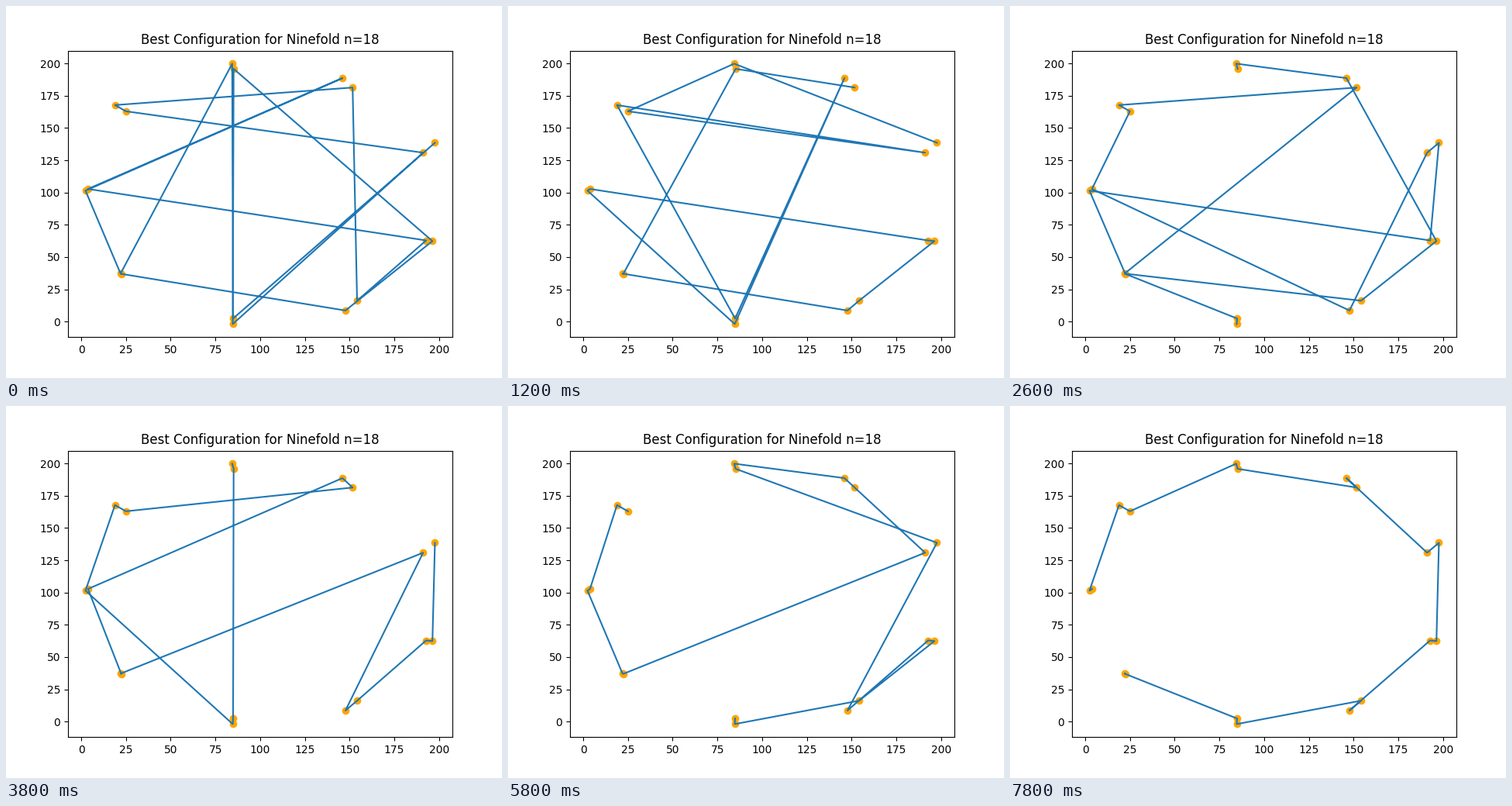
Recreate the animation shown at these times as a matplotlib script. Size 640 px wide and 480 px high, loop 8000 ms.

```python
import numpy as np
import matplotlib.pyplot as plt
from matplotlib.animation import FuncAnimation

FRAMES, STEP_MS = 40, 200

# Eighteen stops, two near each corner of a nonagon
NODES = dict(
    A=(84.4, 199.9), B=(85.2, 195.9), C=(146.0, 188.7), D=(151.7, 181.4),
    E=(18.9, 167.8), F=(25.0, 163.0), G=(191.1, 130.9), H=(197.7, 138.6),
    I=(2.4, 101.5), J=(3.8, 102.8), K=(22.0, 37.2), R=(22.4, 37.0),
    L=(84.9, 2.4), M=(84.7, -1.9), N=(147.7, 8.6), O=(154.2, 16.2),
    P=(192.8, 62.9), Q=(196.3, 62.4),
)

# Frame number -> visiting order reached there
TOURS = {
    0: "HLAKICJPODEFGMBQNR",
    6: "HAFGELCMIJPQONKRBD",
    13: "MLRIPHGNJFEDKOQCAB",
    19: "HQPONGKRJCDFEIMLBA",
    23: "HGQJEBACDFILKRMNOP",
    29: "LMOQPNHBACDGRKIJEF",
    39: "RKLMONPQHGCDBAFEIJ",
}


def reversals(start, goal):
    """Every order met while turning start into goal by segment reversals."""
    tour, states = start, [start]
    for i, stop in enumerate(goal):
        j = tour.index(stop)
        if j != i:
            tour = tour[:i] + tour[i:j + 1][::-1] + tour[j + 1:]
            states.append(tour)
    return states


def schedule():
    marks = sorted(TOURS)
    tours = [TOURS[0]]
    for a, b in zip(marks, marks[1:]):
        states = reversals(TOURS[a], TOURS[b])
        for k in range(1, b - a + 1):
            tours.append(states[round(k / (b - a) * (len(states) - 1))])
    return tours


def path(tour):
    return np.array([NODES[stop] for stop in tour]).T


tours = schedule()
fig, ax = plt.subplots(figsize=(6.4, 4.8), dpi=100)
ax.scatter(*path(NODES), color="orange")
line, = ax.plot(*path(tours[0]), color="C0")
ax.set_title("Best Configuration for Ninefold n=18")


def update(frame):
    line.set_data(*path(tours[frame]))
    return line,


anim = FuncAnimation(fig, update, frames=FRAMES, interval=STEP_MS,
                     repeat=True, repeat_delay=0)
plt.show()
```
